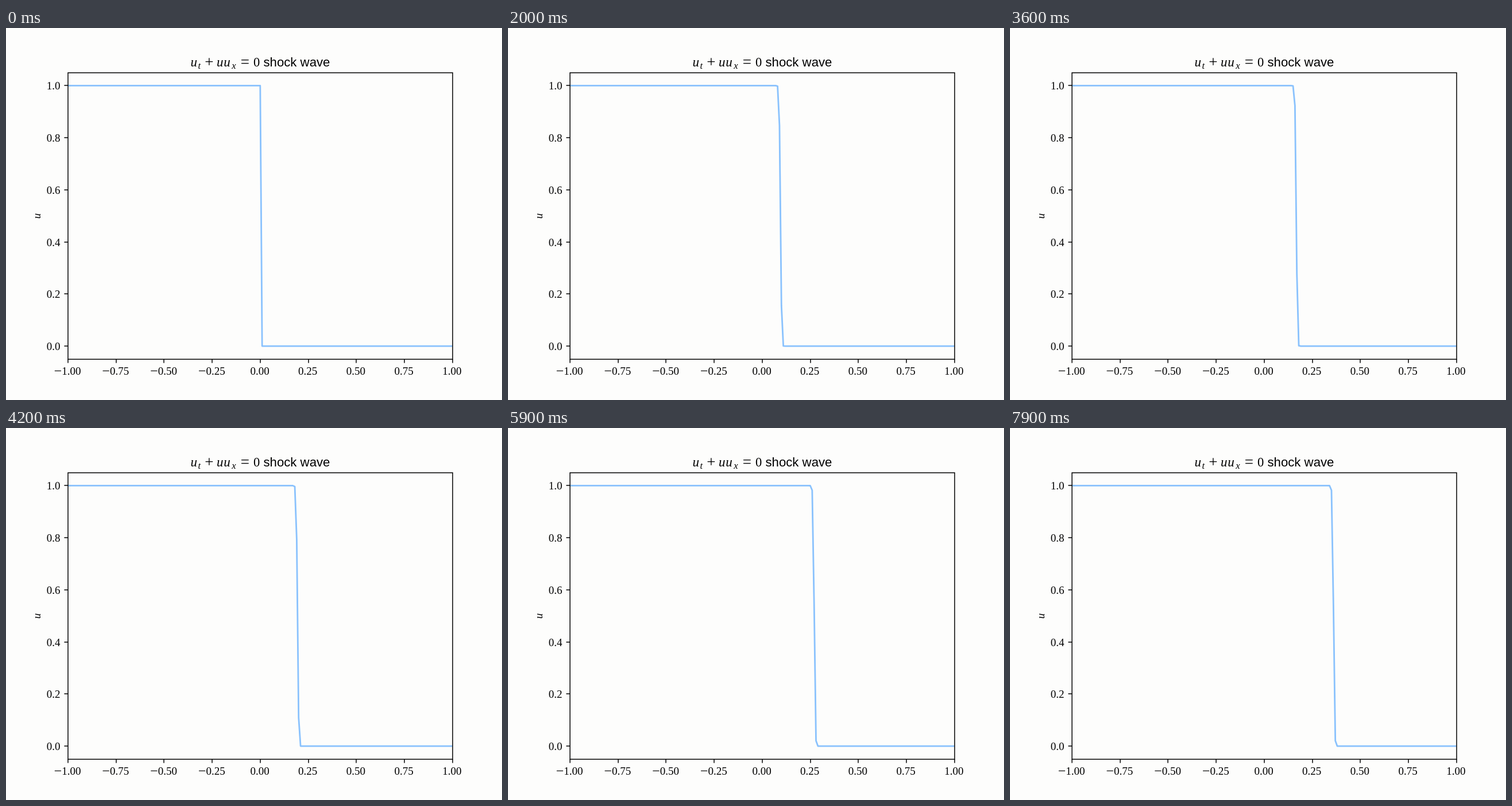
An HTML page that plays this animation: 864 by 648 pixels, repeating every 8 s.

```html
<!DOCTYPE html>
<html lang="en">
<head>
<meta charset="utf-8">
<title>Shock wave</title>
<style>
  html, body { margin: 0; width: 100%; height: 100%; overflow: hidden; background: #fdfdfc; }
  svg { display: block; width: 864px; height: 648px; }
  text { font-family: "Liberation Serif", "Times New Roman", serif; font-size: 19px; }
  .it { font-style: italic; font-size: 23px; }
  .sub { font-style: italic; font-size: 16.5px; }
  .op { font-size: 27px; }
  .sans { font-family: "Liberation Sans", Arial, sans-serif; font-size: 22.2px; }
  .axes { fill: none; stroke: #000; stroke-width: 1.5; }
  #wave { fill: none; stroke: #8ac2fd; stroke-width: 2.8; stroke-linejoin: round; }
</style>
</head>
<body>
<svg viewBox="0 0 864 648">
  <polyline id="wave"/>
  <rect class="axes" x="108" y="78" width="670" height="499"/>
  <path class="axes" id="ticks"/>
  <g id="labels"></g>
  <text class="it" x="321.5" y="67">u</text>
  <text class="sub" x="334.5" y="70.5">t</text>
  <text class="op" x="346.3" y="68.3">+</text>
  <text class="it" x="367" y="67">u</text>
  <text class="it" x="379.2" y="67">u</text>
  <text class="sub" x="393.3" y="70.5">x</text>
  <text class="op" x="408.8" y="68.3">=</text>
  <text x="431" y="67" style="font-size:22.5px">0</text>
  <text class="sans" x="448.5" y="67">shock wave</text>
  <text class="it" transform="translate(60 327.5) rotate(-90)" text-anchor="middle" style="font-size:19px">u</text>
</svg>
<script>
const $ = id => document.getElementById(id);
const px = x => 108 + (x + 1) * 334.8;
const py = u => 554.04 - u * 453.6;

// Axis ticks and their labels
let ticks = '', labels = '';
for (let i = 0; i <= 8; i++) {
  const v = -1 + i / 4, x = Math.round(px(v));
  const minus = v < 0 ? '<tspan font-size="24" dy="1">−</tspan><tspan dy="-1">' : '<tspan>';
  ticks += `M${x} 577v6.6`;
  labels += `<text x="${px(v) - 0.8}" y="603.5" text-anchor="middle">${minus}${Math.abs(v).toFixed(2)}</tspan></text>`;
}
for (let i = 0; i <= 5; i++) {
  const v = i / 5, y = Math.round(py(v));
  ticks += `M108 ${y}h-6.6`;
  labels += `<text x="94.5" y="${y + 6.8}" text-anchor="end">${v.toFixed(1)}</text>`;
}
$('ticks').setAttribute('d', ticks);
$('labels').innerHTML = labels;

// Conservative upwind scheme for u_t + (u²/2)_x = 0 with dt/dx = 0.9
const STEPS = 80, STEP_MS = 100, HALF_RATIO = 0.45;
const states = [Array.from({ length: 201 }, (_, j) => j <= 100 ? 1 : 0)];
while (states.length < STEPS) {
  const u = states[states.length - 1];
  states.push(u.map((v, j) => j ? v - HALF_RATIO * (v * v - u[j - 1] ** 2) : v));
}
const curves = states.map(u =>
  u.map((v, j) => `${px(-1 + j / 100).toFixed(2)},${py(v).toFixed(2)}`).join(' '));

const start = performance.now();
function draw() {
  const step = Math.floor((performance.now() - start) / STEP_MS) % STEPS;
  $('wave').setAttribute('points', curves[step]);
  requestAnimationFrame(draw);
}
draw();
</script>
</body>
</html>
```
